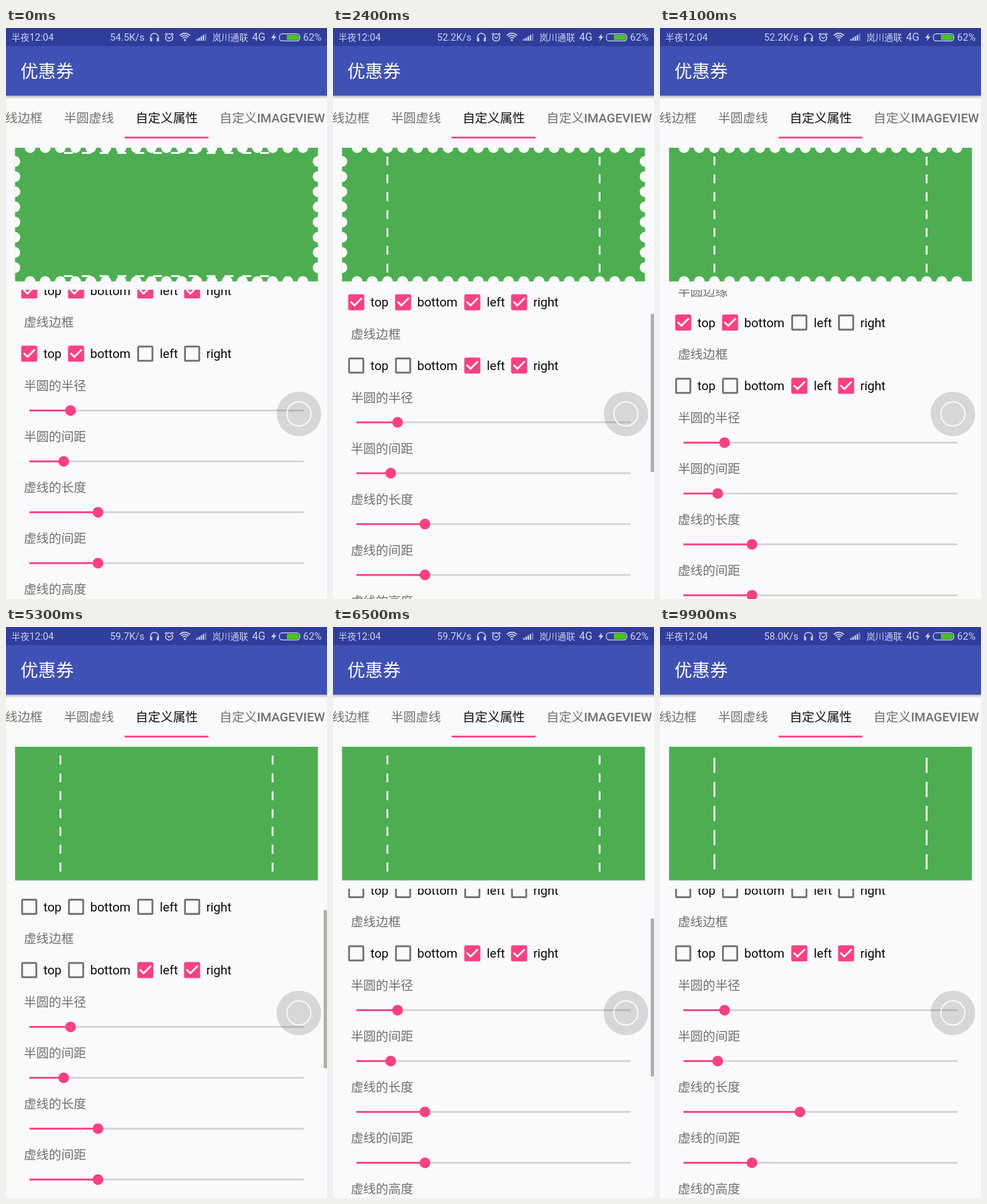
These frames come from a looping animation (480 by 853 pixels, 10 s). An HTML page with a canvas:

```html
<!DOCTYPE html>
<html lang="zh">
<head>
<meta charset="utf-8">
<title>优惠券</title>
<style>
  html, body { margin: 0; width: 100%; height: 100%; overflow: hidden; background: #faf9fc; }
  canvas { display: block; width: 480px; height: 853px; }
</style>
</head>
<body>
<canvas id="stage"></canvas>
<script>
const W = 480, H = 853, LOOP = 10000, STEP = 100;
const DP = 4 / 3;
const PINK = '#ff4081', BG = '#faf9fc', GREY = '#707073', GREEN = '#4cae51', TRACK = '#d4d3d6';
const FONT = 'Roboto, "Noto Sans CJK SC", "Noto Sans CJK", sans-serif';
const LIST_TOP = 391;
const CARD = { x: 13.33, y: 178.67, w: 453.33, h: 200 };

const canvas = document.getElementById('stage');
const ratio = window.devicePixelRatio || 1;
canvas.width = W * ratio;
canvas.height = H * ratio;
const c = canvas.getContext('2d');

const clamp = v => Math.max(0, Math.min(1, v));
const lerp = (a, b, p) => a + (b - a) * p;

// Checkbox rows: initial state and the time at which each one is tapped
const NAMES = ['top', 'bottom', 'left', 'right'];
const BOX_X = [34.7, 104.8, 208.3, 278.3];
const LABEL_X = [56, 126, 230, 299.5];
const EDGES = { y: 392, start: [1, 1, 1, 1], taps: [4300, 4700, 3200, 3700], ripple: false };
const DASHES = { y: 486.5, start: [1, 1, 0, 0], taps: [100, 600, 1300, 1800], ripple: true };
const isOn = (row, i, t) => Boolean(row.start[i]) !== (t >= row.taps[i]);

// List offset segments: start, end, from, to, easing power
const SCROLLS = [
  [2300, 2700, 0, 48, 1.6],
  [5200, 5300, 48, 26, 1],
  [5300, 5900, 26, -101, 1.6],
  [6100, 6500, -101, 1, 1.6]
];
function scrollAt(t) {
  let y = 0;
  for (const [a, b, from, to, power] of SCROLLS)
    if (t >= a) y = lerp(from, to, 1 - Math.pow(1 - clamp((t - a) / (b - a)), power));
  return y;
}

function barAlpha(t) {
  if (t >= 2400 && t < 3400) return clamp((3400 - t) / 300);
  if (t >= 5300 && t < 7200) return clamp((7200 - t) / 300);
  return 0;
}

// Dash length in dp, set by the dragged slider
function dashLength(t) {
  if (t < 8000) return 10;
  return t < 9100 ? Math.min(16, 12 + Math.floor((t - 8000) / 100)) : 17;
}

function speedAt(t) {
  return (t < 600 ? '54.5' : t < 4600 ? '52.2' : t < 9100 ? '59.7' : '58.0') + 'K/s';
}

function text(s, x, y, size, color, align = 'left', weight = 400) {
  c.font = `${weight} ${size}px ${FONT}`;
  c.fillStyle = color;
  c.textAlign = align;
  c.fillText(s, x, y);
}

function rect(x, y, w, h, color) {
  c.fillStyle = color;
  c.fillRect(x, y, w, h);
}

function disc(x, y, r, color) {
  c.fillStyle = color;
  c.beginPath();
  c.arc(x, y, r, 0, 7);
  c.fill();
}

function line(color, width, ...pts) {
  c.strokeStyle = color;
  c.lineWidth = width;
  c.beginPath();
  pts.forEach(([x, y], i) => i ? c.lineTo(x, y) : c.moveTo(x, y));
  c.stroke();
}

function arc(x, y, r, from, to, color, width) {
  c.strokeStyle = color;
  c.lineWidth = width;
  c.beginPath();
  c.arc(x, y, r, from, to);
  c.stroke();
}

function statusBar(t) {
  const ink = '#cdd1ee';
  rect(0, 0, W, 27, '#303d9b');
  text('半夜', 8, 19, 13.4, ink);
  text('12:04', 35, 19, 14.7, ink);
  text(speedAt(t), 207, 19, 14.7, ink, 'right');

  // Headphones
  arc(222, 14, 6, Math.PI * 0.85, Math.PI * 2.15, ink, 1.4);
  rect(215.5, 14.5, 3, 5.5, ink);
  rect(225.5, 14.5, 3, 5.5, ink);

  // Alarm clock
  arc(244, 14.2, 5.4, 0, 7, ink, 1.4);
  line(ink, 1.3, [241.5, 13], [244, 15.5], [247, 13]);
  line(ink, 1.5, [237.5, 10], [240.5, 7.5]);
  line(ink, 1.5, [247.5, 7.5], [250.5, 10]);

  // Wireless
  for (const r of [3.8, 7, 10.2]) arc(267.5, 18, r, -Math.PI * 0.77, -Math.PI * 0.23, ink, 1.7);
  disc(267.5, 18, 1.6, ink);

  // Signal bars
  for (let i = 0; i < 5; i++) rect(284.5 + i * 3.2, 16.5 - i * 2, 2.2, 2.5 + i * 2, i < 4 ? ink : '#7580c4');

  text('岚川通联', 308.5, 19, 13.4, ink);
  text('4G', 368, 19.3, 16, ink);

  c.fillStyle = ink;
  c.beginPath();
  for (const [x, y] of [[402, 8], [396.5, 15], [400, 15], [398.5, 20], [404.5, 12.5], [401, 12.5]]) c.lineTo(x, y);
  c.fill();

  c.strokeStyle = ink;
  c.lineWidth = 1.3;
  c.beginPath();
  c.roundRect(408.7, 8.7, 30.6, 10.6, 4.5);
  c.stroke();
  c.fillStyle = '#48c41c';
  c.beginPath();
  c.roundRect(420, 10, 18, 8, [0, 3.5, 3.5, 0]);
  c.fill();
  text('62%', 472, 19, 14.9, ink, 'right');
}

function header() {
  rect(0, 27, W, 74, '#3f51b5');
  const shade = c.createLinearGradient(0, 101, 0, 106);
  shade.addColorStop(0, 'rgba(0,0,0,.26)');
  shade.addColorStop(1, 'rgba(0,0,0,0)');
  rect(0, 101, W, 5, shade);
  text('优惠券', 21.5, 74, 26.6, '#fff');

  text('虚线边框', 54.7, 140.5, 18.67, GREY, 'right');
  text('半圆虚线', 86.7, 140.5, 18.67, GREY);
  text('自定义属性', 193.7, 140.5, 18.67, '#101010');
  text('自定义', 319.3, 140.5, 18.67, GREY);
  text('IMAGEVIEW', 375.3, 140.5, 18.67, GREY, 'left', 500);
  rect(177.3, 162.4, 125.4, 2.6, PINK);
}

// Half circles spread evenly over a span; returns their centres
function notches(span) {
  const r = 6 * DP, gap = 5 * DP, period = 2 * r + gap;
  const n = Math.floor((span - gap) / period);
  const first = (span - n * period + gap) / 2 + r;
  return Array.from({ length: n }, (_, i) => first + i * period);
}

// Dash starts inside a span shortened by a margin on both sides
function dashStarts(span, margin, len) {
  const gap = 10 * DP, period = len + gap, inner = span - 2 * margin;
  const n = Math.floor((inner + gap) / period + 1e-6);
  const first = margin + (inner - n * period + gap) / 2;
  return Array.from({ length: n }, (_, i) => first + i * period);
}

function coupon(t) {
  const { x, y, w, h } = CARD;
  const thick = 2 * DP, mx = 50 * DP, my = 5 * DP, len = dashLength(t) * DP;
  c.save();
  c.beginPath();
  c.rect(x, y, w, h);
  c.clip();
  rect(x, y, w, h, GREEN);

  const edge = i => isOn(EDGES, i, t);
  const dash = i => isOn(DASHES, i, t);
  const r = 6 * DP;
  for (const d of notches(w)) {
    if (edge(0)) disc(x + d, y, r, '#fff');
    if (edge(1)) disc(x + d, y + h, r, '#fff');
  }
  for (const d of notches(h)) {
    if (edge(2)) disc(x, y + d, r, '#fff');
    if (edge(3)) disc(x + w, y + d, r, '#fff');
  }
  for (const d of dashStarts(w, mx, len)) {
    if (dash(0)) rect(x + d, y + my, len, thick, '#fff');
    if (dash(1)) rect(x + d, y + h - my - thick, len, thick, '#fff');
  }
  for (const d of dashStarts(h, my, len)) {
    if (dash(2)) rect(x + mx, y + d, thick, len, '#fff');
    if (dash(3)) rect(x + w - mx - thick, y + d, thick, len, '#fff');
  }
  c.restore();
}

function tapRipple(x, y, age, on) {
  if (age < 0 || age > 450) return;
  const alpha = (on ? 0.24 : 0.12) * clamp((500 - age) / 350);
  disc(x, y, lerp(16, 25, clamp(age / 100)), on ? `rgba(255,64,129,${alpha})` : `rgba(0,0,0,${alpha})`);
}

// fill: 0 is an empty outline, 1 is a finished check mark
function checkbox(x, y, fill, on) {
  c.save();
  c.translate(x, y);
  const k = 1 - 0.08 * Math.sin(Math.PI * fill);
  c.scale(k, k);
  c.fillStyle = on ? PINK : GREY;
  c.beginPath();
  c.roundRect(-12, -12, 24, 24, 2.6);
  const hole = 9.33 * (1 - fill / 0.4);
  if (hole > 0) c.rect(-hole, -hole, hole * 2, hole * 2);
  c.fill('evenodd');
  const mark = (fill - 0.4) / 0.6;
  if (mark > 0) {
    c.scale(mark, mark);
    line(BG, 2.67, [-8.4, -0.9], [-2.7, 4.8], [8.4, -6.3]);
  }
  c.restore();
}

function checkRow(row, t, shift) {
  const y = row.y + shift;
  NAMES.forEach((name, i) => {
    const on = isOn(row, i, t), age = t - row.taps[i];
    const p = age < 0 ? 1 : clamp((age + 50) / 350);
    if (row.ripple) tapRipple(BOX_X[i], y, age, on);
    checkbox(BOX_X[i], y, on ? p : 1 - p, on);
    text(name, LABEL_X[i], y + 6.7, 18.67, '#080808');
  });
}

function slider(y, part, grow = 0, halo = 0) {
  const x = 35 + 410 * part;
  rect(35, y - 1.33, 410, 2.67, TRACK);
  rect(35, y - 1.33, x - 35, 2.67, PINK);
  if (halo > 0) disc(x, y, lerp(12, 21.3, clamp(grow * 2)), `rgba(0,0,0,${0.12 * halo})`);
  disc(x, y, 8 + 4 * grow, PINK);
}

function list(t) {
  const shift = scrollAt(t);
  const press = t < 9400 ? clamp((t - 8000) / 300) : clamp((9800 - t) / 500);
  const sliders = [
    ['半圆的半径', 0.15], ['半圆的间距', 0.125], ['虚线的长度', dashLength(t) / 40],
    ['虚线的间距', 0.25], ['虚线的高度', 0.2], ['顶部虚线距离顶部的距离', 0.05]
  ];
  c.save();
  c.beginPath();
  c.rect(0, LIST_TOP, W, H - LIST_TOP);
  c.clip();
  text('半圆边缘', 26.7, 352 + shift, 18.67, GREY);
  checkRow(EDGES, t, shift);
  text('虚线边框', 26.7, 446 + shift, 18.67, GREY);
  checkRow(DASHES, t, shift);
  sliders.forEach(([name, part], i) => {
    const y = 571.4 + i * 76 + shift;
    text(name, 26.7, y - 30.6, 18.67, GREY);
    slider(y, part, i === 2 ? press : 0, i === 2 ? press : 0);
  });
  const alpha = barAlpha(t);
  if (alpha > 0) rect(475, 436 - shift / 2, 5, 236, `rgba(0,0,0,${0.3 * alpha})`);
  c.restore();
}

function floatingButton() {
  disc(438, 576.5, 33.3, 'rgba(0,0,0,.14)');
  arc(438, 576.5, 18, 0, 7, 'rgba(255,255,255,.85)', 1.9);
}

function draw(now) {
  const t = Math.floor((now % LOOP) / STEP) * STEP;
  c.setTransform(ratio, 0, 0, ratio, 0, 0);
  rect(0, 0, W, H, BG);
  statusBar(t);
  header();
  coupon(t);
  list(t);
  floatingButton();
}

let origin = null;
function tick(now) {
  if (origin === null) origin = now;
  draw(now - origin);
  requestAnimationFrame(tick);
}
draw(0);
requestAnimationFrame(tick);
</script>
</body>
</html>
```
